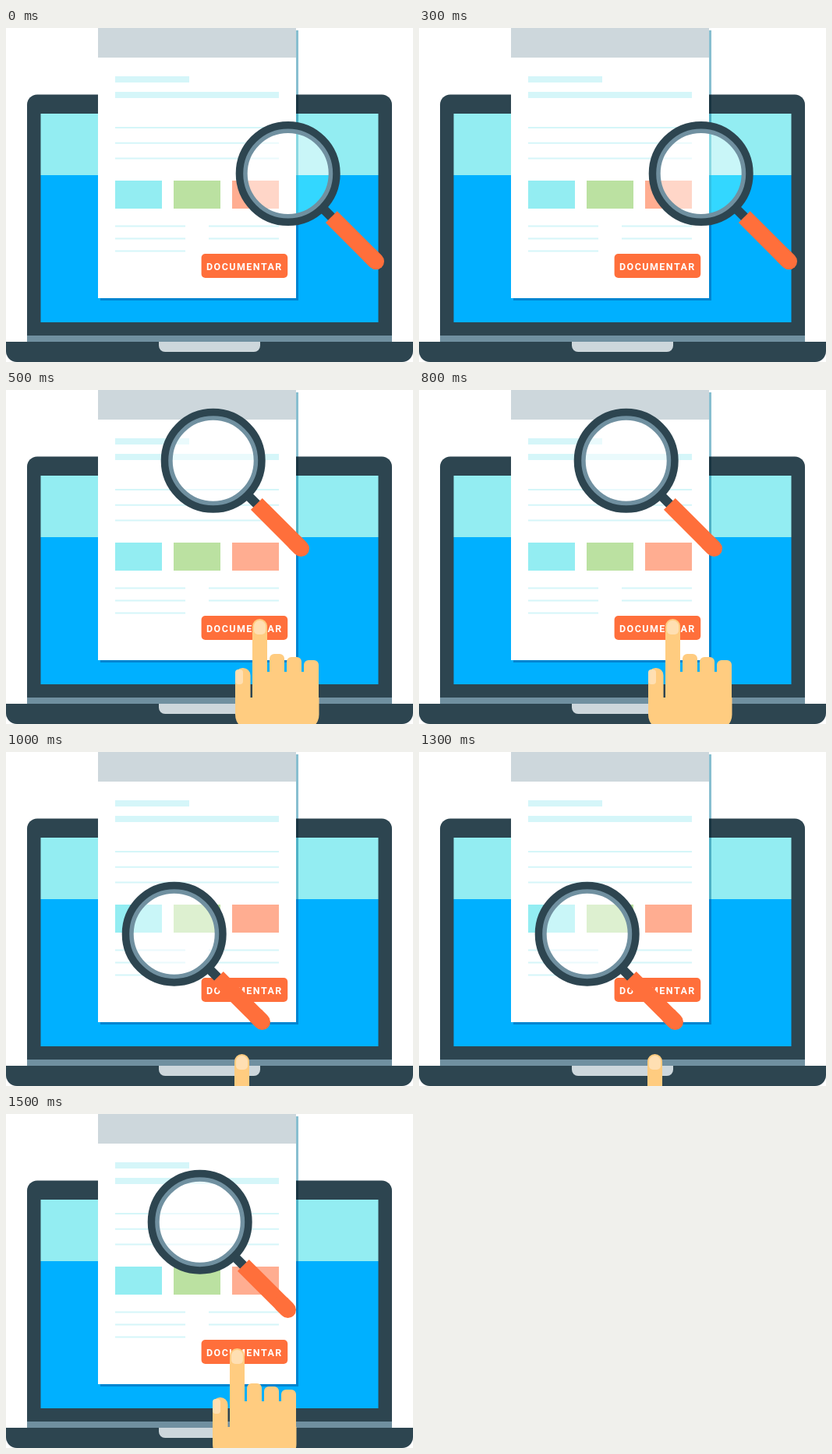
These frames come from a looping animation (522 px wide and 429 px high, 2 s). An HTML page with a canvas:

```html
<!DOCTYPE html>
<html lang="es">
<head>
<meta charset="utf-8">
<style>
  html, body { margin: 0; width: 100%; height: 100%; overflow: hidden; background: #fff; }
  canvas { display: block; }
</style>
</head>
<body>
<canvas width="522" height="429"></canvas>
<script>
const W = 522, H = 429, STEP = 500;
const ctx = document.querySelector('canvas').getContext('2d');
const DARK = '#2d4550', STEEL = '#7090a0', SILVER = '#cdd7dc', AQUA = '#93edf2',
      PALE = '#d5f6f9', ORANGE = '#ff6f3b', SKIN = '#ffcc80', NAIL = '#ffdfb2';

// Each pose holds for STEP ms: lens centre and top left of the index finger
const poses = [
  { lens: [361.7, 187] },
  { lens: [265.7, 90.8], finger: [316, 294] },
  { lens: [215.7, 233.7], finger: [293, 388] },
  { lens: [248.7, 138.7], finger: [287, 301] },
];

function box(color, x, y, w, h, topRadius = 0, bottomRadius = topRadius) {
  ctx.fillStyle = color;
  ctx.beginPath();
  ctx.roundRect(x, y, w, h, [topRadius, topRadius, bottomRadius, bottomRadius]);
  ctx.fill();
}

// Box centred across the stage
const centred = (color, y, w, h, ...radii) => box(color, (W - w) / 2, y, w, h, ...radii);

function disc(color, r) {
  ctx.fillStyle = color;
  ctx.beginPath();
  ctx.arc(0, 0, r, 0, 7);
  ctx.fill();
}

function ring(color, inner, outer) {
  ctx.strokeStyle = color;
  ctx.lineWidth = outer - inner;
  ctx.beginPath();
  ctx.arc(0, 0, (inner + outer) / 2, 0, 7);
  ctx.stroke();
}

function blend(mode, paint) {
  ctx.globalCompositeOperation = mode;
  paint();
  ctx.globalCompositeOperation = 'source-over';
}

function drawLaptop() {
  centred(DARK, 85.4, 468, 311, 13, 0);
  centred(AQUA, 110, 433, 79);
  centred('#00b0ff', 189, 433, 189);
  centred(STEEL, 395, 468, 8);
  centred(DARK, 403, W, 26, 0, 14);
  centred(SILVER, 403, 130, 13, 0, 8);
}

function drawPage() {
  blend('multiply', () => box('#88bfd0', 121, 3, 254, 347));
  box('#fff', 118, 0, 254, 347);
  box(SILVER, 118, 0, 254, 38);
  box(PALE, 140, 62, 95, 8);
  box(PALE, 140, 82, 210, 8);
  [AQUA, '#bbe1a1', '#ffad91'].forEach((color, i) => {
    box(color, 140 + 75 * i, 196, 60, 36);
    box(PALE, 140, 127 + 19.8 * i, 210, 2);
    box(PALE, 140, 253.5 + 16 * i, 90, 2);
    if (i < 2) box(PALE, 260, 253.5 + 16 * i, 90, 2);
  });
  box(ORANGE, 250.6, 290, 110.6, 31, 5);
  ctx.fillStyle = '#fff';
  ctx.font = '700 12.5px Roboto, sans-serif';
  ctx.letterSpacing = '1.45px';
  ctx.fillText('DOCUMENTAR', 257, 311);
}

function drawMagnifier(x, y) {
  ctx.save();
  ctx.translate(x, y);
  blend('overlay', () => disc('rgba(255,255,255,.375)', 53));
  disc('rgba(255,255,255,.2)', 53);
  ring(STEEL, 52, 59);
  ring(DARK, 57.5, 67);
  ctx.rotate(Math.PI / 4);
  box(DARK, 64, -6, 18, 12);
  box(ORANGE, 78.7, -10.5, 80, 21);
  box(ORANGE, 138, -10.5, 32, 21, 10.5);
  ctx.restore();
}

function drawHand(x, y) {
  ctx.save();
  ctx.translate(x, y);
  box(SKIN, 0, 0, 19, 110, 9.5, 0);
  box(SKIN, -22, 63, 19.5, 50, 9.5, 0);
  for (let i = 0; i < 3; i++) box(SKIN, 22 + 22 * i, 45 + 4 * i, 19, 40, 6, 0);
  box(SKIN, 10, 68, 75, 40);
  box(SKIN, -22, 101, 107.5, 42, 0, 20);
  box(NAIL, 2, 2, 15, 18, 7.5, 5);
  box(NAIL, -22, 65, 10, 19, 4);
  ctx.restore();
}

function draw() {
  const { lens, finger } = poses[Math.floor(performance.now() / STEP) % poses.length];
  ctx.fillStyle = '#fff';
  ctx.fillRect(0, 0, W, H);
  drawLaptop();
  drawPage();
  drawMagnifier(...lens);
  if (finger) drawHand(...finger);
  requestAnimationFrame(draw);
}

draw();
</script>
</body>
</html>
```
